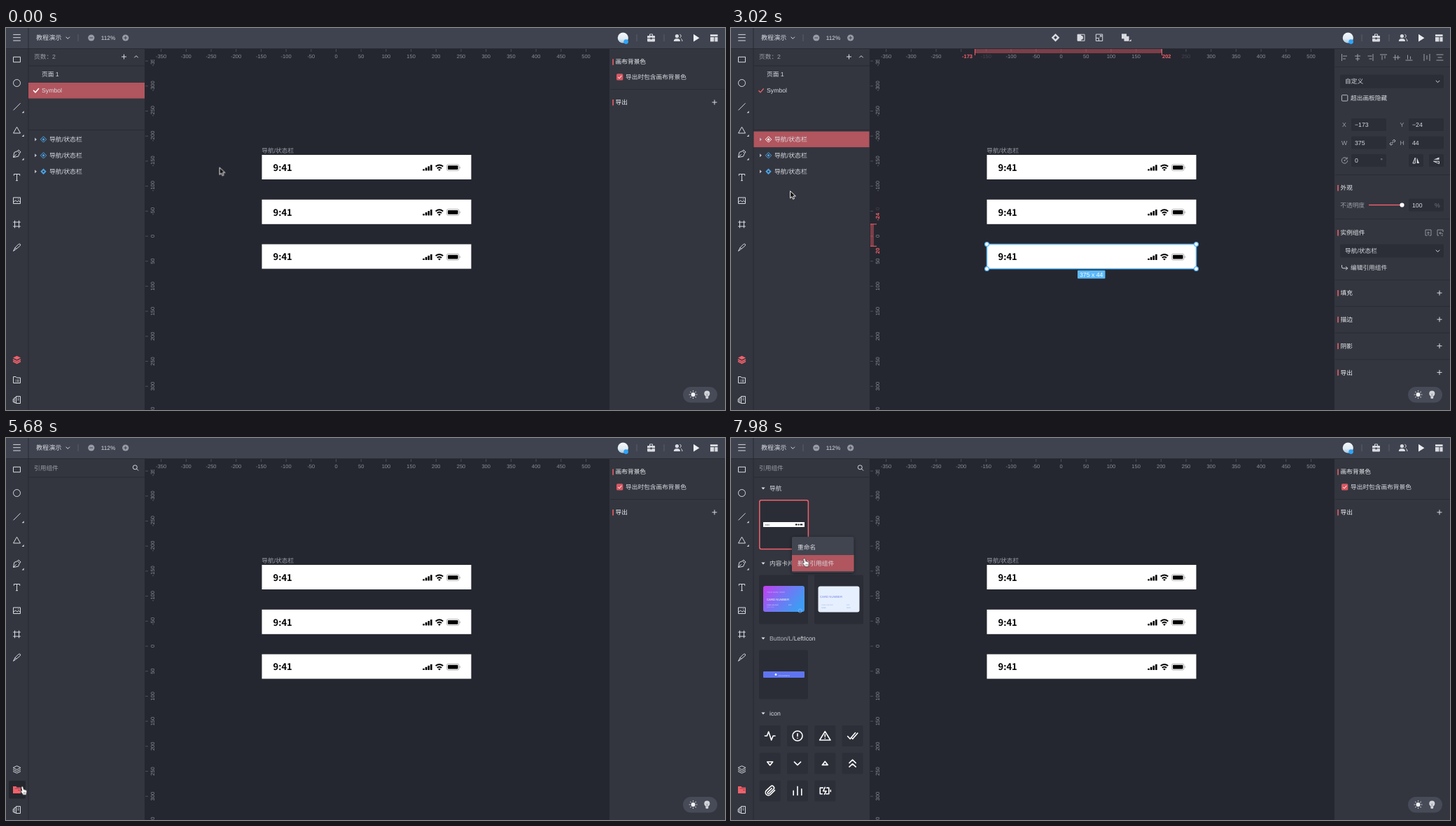
Recreate the animation shown at these times as an HTML page. Size 1027 by 545 pixels, loop 8000 ms.

```html
<!DOCTYPE html>
<html lang="zh-CN">
<head>
<meta charset="utf-8">
<title>Design editor</title>
<style>
html, body { margin: 0; width: 100%; height: 100%; overflow: hidden; background: #252730; }
svg { display: block; width: 100%; height: 100%; }
text { font: 8.7px "Liberation Sans", "Noto Sans CJK SC", sans-serif; fill: #d9dbe0; text-rendering: geometricPrecision; white-space: pre; }
.dim { fill: #9b9ea8; }
.tick { font-size: 7.5px; fill: #8b8e97; text-anchor: middle; }
.hot { font-size: 7.5px; font-weight: 700; fill: #f2616b; }
.mid { text-anchor: middle; }
.clock { font: 700 13px "Noto Sans CJK SC", "Noto Sans", sans-serif; fill: #000; }
.i { fill: none; stroke: #d9dbe0; stroke-width: 1; }
.w { stroke: #fff; stroke-width: 1.6; stroke-linejoin: round; stroke-linecap: round; }
.blue { fill: #5bb9fb; }

/* Every timed part is hidden or shown in hard steps; 1% is 80 ms. */
.t { opacity: 0; animation: 8s step-end infinite; }
.idle { animation-name: idle; } .sel { animation-name: sel; }
.s1 { animation-name: s1; } .s2 { animation-name: s2; } .s3 { animation-name: s3; } .inst { animation-name: inst; }
.h1 { animation-name: h1; } .h2 { animation-name: h2; } .h3 { animation-name: h3; }
.pages { animation-name: pages; } .lib { animation-name: lib; } .list { animation-name: list; }
.tile { animation-name: tile; } .pick { animation-name: pick; } .tag { animation-name: tag; }
.menu { animation-name: menu; } .del { animation-name: del; }
.arrow { animation-name: arrow; } .hand { animation-name: hand; }
@keyframes idle { 0%, 45.625% { opacity: 1 } 19.625% { opacity: 0 } }
@keyframes sel { 19.625% { opacity: 1 } 0%, 45.625% { opacity: 0 } }
@keyframes s3 { 19.625% { opacity: 1 } 0%, 25.625% { opacity: 0 } }
@keyframes s2 { 25.625% { opacity: 1 } 0%, 33.5% { opacity: 0 } }
@keyframes s1 { 33.5% { opacity: 1 } 0%, 45.625% { opacity: 0 } }
@keyframes inst { 25.625% { opacity: 1 } 0%, 45.625% { opacity: 0 } }
@keyframes h3 { 14% { opacity: 1 } 0%, 19.625% { opacity: 0 } }
@keyframes h2 { 23.375% { opacity: 1 } 0%, 25.625% { opacity: 0 } }
@keyframes h1 { 31.5% { opacity: 1 } 0%, 33.5% { opacity: 0 } }
@keyframes pages { 0% { opacity: 1 } 71% { opacity: 0 } }
@keyframes lib { 0% { opacity: 0 } 71% { opacity: 1 } }
@keyframes list { 0% { opacity: 0 } 72.875% { opacity: 1 } }
@keyframes tile { 57.875% { opacity: 1 } 0%, 74.875% { opacity: 0 } }
@keyframes pick { 0% { opacity: 0 } 80.875% { opacity: 1 } }
@keyframes tag { 80.875% { opacity: 1 } 0%, 96% { opacity: 0 } }
@keyframes menu { 0% { opacity: 0 } 88.5% { opacity: .45 } 92.25% { opacity: 1 } }
@keyframes del { 0% { opacity: 0 } 96% { opacity: 1 } }
@keyframes arrow { 0%, 35.625%, 74.875% { opacity: 1 } 14%, 57.875%, 80.875% { opacity: 0 } }
@keyframes hand { 0%, 35.625%, 74.875% { opacity: 0 } 14%, 57.875%, 80.875% { opacity: 1 } }
.cursor { animation: move 8s step-end infinite; }
@keyframes move {
  0% { transform: translate(304.5px, 198.5px) }
  1.75% { transform: translate(304px, 199px) }
  6.625% { transform: translate(268px, 214px) }
  8.5% { transform: translate(195px, 236px) }
  10.375% { transform: translate(122px, 245px) }
  12.25% { transform: translate(92px, 236px) }
  14% { transform: translate(86px, 209px) }
  15.875% { transform: translate(85px, 200px) }
  23.375% { transform: translate(87px, 184px) }
  25.625% { transform: translate(89px, 176px) }
  27.875% { transform: translate(89px, 174px) }
  31.5% { transform: translate(90px, 158px) }
  33.5% { transform: translate(91px, 153px) }
  35.625% { transform: translate(92px, 134px) }
  37.75% { transform: translate(84px, 232px) }
  39.875% { transform: translate(77px, 297px) }
  41.875% { transform: translate(73px, 326.5px) }
  49.25% { transform: translate(67px, 360px) }
  51.375% { transform: translate(47px, 420px) }
  53.5% { transform: translate(26px, 476px) }
  55.625% { transform: translate(14px, 510px) }
  57.875% { transform: translate(15px, 503px) }
  65.375% { transform: translate(18px, 499px) }
  67.25% { transform: translate(20px, 496.5px) }
  74.875% { transform: translate(30px, 438px) }
  76.875% { transform: translate(60px, 305px) }
  78.875% { transform: translate(80px, 190px) }
  80.875% { transform: translate(84px, 146px) }
  82.875% { transform: translate(84px, 140px) }
  84.75% { transform: translate(84.6px, 140px) }
  92.25% { transform: translate(93px, 150px) }
  94.125% { transform: translate(97.5px, 159px) }
  96% { transform: translate(99px, 165px) }
  97.875% { transform: translate(101px, 169px) }
  99.75% { transform: translate(101.5px, 171px) }
}
</style>
</head>
<body>
<svg viewBox="0 0 1027 545" xmlns="http://www.w3.org/2000/svg"></svg>
<script>
const CANVAS = '#252730', PANEL = '#33363f', BAR = '#3e434f', EDGE = '#292b33',
      FIELD = '#2b2e37', ROW = '#b1555e', RED = '#f2616b', BLUE = '#5bb9fb', GREY = '#9b9ea8';

const txt = (x, y, s, a = '') => `<text x="${x}" y="${y + 3.1}" ${a}>${s}</text>`;
const box = (x, y, w, h, fill, a = '') => `<rect x="${x}" y="${y}" width="${w}" height="${h}" fill="${fill}" ${a}/>`;
const dot = (x, y, r, fill, a = '') => `<circle cx="${x}" cy="${y}" r="${r}" fill="${fill}" ${a}/>`;
const icon = (x, y, d, a = '', cls = '') => `<path class="i ${cls}" transform="translate(${x} ${y})" d="${d}" ${a}/>`;
const solid = (x, y, d, fill = '#d9dbe0') => `<path transform="translate(${x} ${y})" d="${d}" fill="${fill}"/>`;
const timed = (cls, ...parts) => `<g class="t ${cls}">${parts.join('')}</g>`;
const each = (list, f) => list.map(f).join('');
const range = (a, b, f) => Array.from({ length: b - a + 1 }, (_, i) => f(a + i)).join('');

const PLUS = 'M-3.5 0h7M0-3.5v7', DOWN = 'M-2.7-1.3L0 1.4 2.7-1.3', UP = 'M-2.7 1.3L0-1.4 2.7 1.3',
      CHECK = 'M-3.5 0l2.5 2.6L3.6-2.8', DIAMOND = 'M0-4.2L4.2 0 0 4.2-4.2 0z',
      STACK = 'M0-5.2l5.5 2.7L0 .2l-5.5-2.7z', STACK2 = 'M-5.5 0L0 2.7 5.5 0M-5.5 2.5L0 5.2l5.5-2.7',
      FOLDER = 'M-5-4.5h3.6l1.2 1.5H5v7.5H-5z';

// Canvas with rulers
const rulers = () =>
  range(-7, 10, n => {
    const x = 471.5 + 35.7 * n;
    return box(x - .5, 30, 1, 4, '#4c4f59') + txt(x, 40, 50 * n, 'class="tick"');
  }) +
  '<clipPath id="side"><path d="M199 45h20v500h-20z"/></clipPath><g clip-path="url(#side)">' +
  range(-7, 7, n => {
    const y = 297 + 35.7 * n;
    return box(199, y - .5, 4, 1, '#4c4f59') + upright(y, 50 * n, 'tick');
  }) + '</g>';
const upright = (y, s, cls) =>
  `<text transform="translate(211.6 ${y}) rotate(-90)" class="${cls}" text-anchor="middle">${s}</text>`;
const fade = (x, y, w, h, o = 1) => box(x, y, w, h, CANVAS, `opacity="${o}"`);
const hSpan = () =>
  fade(318, 36, 30, 10) + fade(348, 36, 25, 10, .7) + fade(606, 36, 29, 10) + fade(635, 36, 25, 10, .7) +
  box(348, 30, 268, 6, RED, 'opacity=".42"') + range(-3, 3, n => box(471 + 35.7 * n, 30, 1, 4, '#8d4b55')) +
  box(348, 30, 1, 9, RED) + box(615, 30, 1, 9, RED) +
  txt(345, 40, '-173', 'class="hot" text-anchor="end"') + txt(616, 40, '202', 'class="hot"');
const vSpan = (value) => {
  const a = 297 + value * .714, b = a + 31.4;
  return fade(204, a - 44, 12, 24, .7) + fade(204, a - 20, 12, 32) + fade(204, b - 4, 12, 19) +
    box(199, a, 5, b - a, RED, 'opacity=".42"') + box(199, a - .5, 9, 1, RED) + box(199, b - .5, 9, 1, RED) +
    upright(a - 10.5, value, 'hot') + upright(b + 6.5, value + 44, 'hot');
};

const board = y => box(365.5, y, 299, 35, '#fff') + txt(381.5, y + 19.8, '9:41', 'class="clock"') +
  range(0, 3, i => box(595.3 + 3.6 * i, y + 20.2 - 2 * i, 2.6, 2.4 + 2 * i, '#000', 'rx=".6"')) +
  icon(619, y + 22, 'M-5.3-5.4Q0-9.6 5.3-5.4M-3.2-2.7Q0-5.3 3.2-2.7', 'style="stroke:#000;stroke-width:1.9"') +
  solid(619, y + 22, 'M-1.9-.9Q0-2.5 1.9-.9L0 1.1z', '#000') +
  box(629.5, y + 13.7, 17.6, 8.8, 'none', 'rx="2.2" stroke="#aaa" stroke-width=".9"') +
  box(631, y + 15.2, 14.6, 5.8, '#000', 'rx="1"') + box(647.9, y + 16.8, 1, 2.6, '#aaa', 'rx=".5"');
const outline = y => box(365.5, y, 299, 35, 'none', `stroke="${BLUE}" stroke-width="1.5"`);
const picked = y => outline(y) +
  each([[365.5, y], [664.5, y], [365.5, y + 35], [664.5, y + 35]],
    ([x, v]) => dot(x, v, 2.9, '#fff', `stroke="${BLUE}" stroke-width="1.2"`)) +
  box(495, y + 37.3, 39.5, 11.7, BLUE, 'rx="1"') + txt(514.7, y + 43.2, '375 x 44', 'class="mid" style="fill:#fff"');
const boardName = cls => txt(365.3, 174.5, '导航/状态栏', `class="${cls}"`);

// Layer list
const BOARDS = { 1: 308.5, 2: 244.8, 3: 181 };
const rowY = n => 136 + 22.9 * n;
const layer = (n, tint = '#4ba5e6') => {
  const y = rowY(n);
  return solid(42.5, y, 'M-1.5-2.5L1.5 0-1.5 2.5z', '#b9bcc4') +
    (n == 3 ? solid(53.5, y, DIAMOND, tint) + dot(53.5, y, 1.2, PANEL)
            : icon(53.5, y, DIAMOND, `style="stroke:${tint}"`) + solid(53.5, y, 'M0-2L2 0 0 2-2 0z', tint)) +
    txt(62, y, '导航/状态栏', 'style="font-size:8.9px"');
};
const layerTools = y =>
  box(165.5, y - .5, 6, 4, '#e6e7ea', 'rx=".6"') + icon(166, y, 'M-1.2-.5v-1.4a1.7 1.7 0 0 1 3.4 0v.6') +
  icon(182.5, y, 'M-4.3 0Q0-5.6 4.3 0 0 5.6-4.3 0z') + dot(182.5, y, 1.5, '#e6e7ea');
const rowFrame = (n, fill, a) => box(32.5, rowY(n) - 11.3, 165, 22.5, fill, a);
const hoverRow = n => timed('h' + n, rowFrame(n, PANEL, `stroke="${RED}" stroke-width=".9"`), layer(n),
  layerTools(rowY(n)), outline(BOARDS[n]), n == 3 ? boardName('blue') : '');
const pickedRow = n => timed('s' + n, rowFrame(n, ROW), layer(n, '#fff'), n > 1 ? layerTools(rowY(n)) : '',
  picked(BOARDS[n]), n == 3 ? boardName('blue') : '', vSpan({ 1: -24, 2: -104, 3: -184 }[n]),
  txt(973, 138, { 1: '−24', 2: '−104', 3: '−184' }[n]));
const pagesPanel = () => timed('pages',
  txt(40, 41, '页数：2', 'class="dim"'), icon(168.5, 41, PLUS), icon(186, 41, UP),
  box(32, 53.5, 166, 1, EDGE), txt(51, 66, '页面 1'),
  timed('idle', box(32, 78, 166, 22.5, ROW), icon(43, 89.3, CHECK, '', 'w" stroke-width="1.2')),
  timed('sel', icon(43, 89.3, CHECK, `style="stroke:${RED};stroke-width:1.3"`)),
  txt(51, 89.2, 'Symbol'), box(32, 145, 166, 1, EDGE),
  layer(1), layer(2), layer(3));

// Component library
const group = (y, s) => solid(46, y, 'M-2.6-1.4h5.2L0 1.6z', '#e0e2e6') + txt(55, y, s);
const thumb = (x, y) => box(x, y, 70, 70, '#2a2d35', 'rx="2"');
const small = (x, y, s, size, fill, a = '') => txt(x, y - 2, s, `style="font-size:${size}px;fill:${fill}" ${a}`);
const glyphs = [
  'M-7.3 0h3l2.3-6 4 12 2.4-6h2.9',
  'M-7 0a7 7 0 1 0 14 0a7 7 0 1 0-14 0M0-3.3V.6M0 3.2v.1',
  'M0-6.4L7.7 6H-7.7zM0-2v3M0 3.5v.1',
  'M-7 .5l3.5 3.8L4-4.5M-.8 3.2l1 1.1L7.3-4',
  'M-4-2.2h8L0 2.8z', 'M-4.6-2L0 2.4 4.6-2', 'M-4 2.2h8L0-2.8z',
  'M-4.6-.6L0-5 4.6-.6M-4.6 5L0 .6 4.6 5',
  'M6.8-.8L.6 5.3a4.1 4.1 0 0 1-5.8-5.8L1-6.2a2.8 2.8 0 0 1 4 4L-1.2 3.8a1.3 1.3 0 0 1-1.9-1.9L2.4-3.5',
  'M-5.8 6V0M0 6V-6M5.8 6V-2.5',
  'M-3-4.3h-4v8.6h3M2.5-4.3h3v8.6H1.6M8-1v2M0-5L-2.6.3h4.4L-.9 5'];
const library = () => timed('lib',
  txt(40, 42.7, '引用组件', 'class="dim"'), icon(184.8, 42.3, 'M-3.5-.5a3 3 0 1 0 6 0a3 3 0 1 0-6 0M1.7 1.7L4.3 4.3'),
  box(32, 55.5, 166, 1, EDGE),
  timed('list',
    group(72, '导航'), thumb(40.5, 88.5), box(46, 120, 59, 7, '#fff'),
    small(49, 124.3, '9:41', 3, '#000'), box(92, 122.5, 2.6, 2, '#111'), dot(96.6, 123.6, 1.1, '#111'), box(98.6, 122.5, 3.6, 2, '#111'),
    timed('tag', txt(75.7, 150.2, '状态栏', 'class="mid"')),
    timed('pick', box(40.8, 88.8, 69.6, 69.6, 'none', `rx="2.5" stroke="${RED}" stroke-width="1.5"`)),
    group(179, '内容卡片'), thumb(40, 195.5), thumb(119, 195.5),
    box(46, 211, 59, 37, 'url(#card)', 'rx="3"'), box(124.5, 211.5, 59, 37, '#e6effe', 'rx="3"'),
    small(51, 220.3, 'YOUR BANK HERE', 2.9, '#f4d8ff', 'opacity=".6"'),
    small(51, 230.5, 'CARD NUMBER', 4.3, '#fff', 'font-weight="700"'),
    small(51, 237.6, 'CARD HOLDER', 2.3, '#e4dcff'), small(82, 237.6, 'EXP', 2.3, '#dfe9ff'),
    small(51, 241, '0000 0000', 2.3, '#d4c8ff', 'opacity=".6"'),
    dot(98.7, 246.5, 2.6, 'none', 'stroke="#8fb6ff" stroke-width=".8"'),
    small(127, 226.5, 'CARD NUMBER', 4.3, '#7386e4', 'font-weight="700"'),
    small(129, 238, 'CARD HOLDER', 2.3, '#9fb4dc'), small(165, 238, 'EXP', 2.3, '#9fb4dc'),
    small(129, 241.6, 'NAME', 2.3, '#86a6dc'), small(165, 241.6, '00/00', 2.3, '#86a6dc'),
    group(286, '<tspan fill="#b4b7bf">Button/L/</tspan>LeftIcon'), thumb(40, 302.5),
    box(46, 333, 59, 9, '#6074f2', 'rx="1"'), dot(64, 337.5, 1.4, '#fff'), small(67.5, 338.6, 'ADD ADDRESS', 2.3, '#e2e6ff'),
    group(393, 'icon'),
    glyphs.map((d, i) => {
      const x = 55.7 + 39.3 * (i % 4), y = 425 + 39.2 * (i >> 2);
      return box(x - 15, y - 15, 30, 30, '#2c2f38', 'rx="2"') + icon(x, y, d, '', 'w');
    }).join('')),
  timed('menu', box(87, 141, 88.5, 51, '#414550', 'rx="2" style="filter:drop-shadow(0 1px 2px #0007)"'),
    timed('del', box(87, 167, 88.5, 23, ROW)), txt(95, 155.4, '重命名'), txt(95, 178.4, '删除引用组件')));

// Inspector
const title = (y, s, add) => box(866.3, y - 4, 1.5, 8.5, RED) + txt(870.6, y, s, 'style="fill:#eceef1"') + (add ? icon(1012, y, PLUS) : '');
const rule = y => box(863, y, 164, 1, EDGE, 'opacity=".8"');
const field = (x, y, w, s = '', h = 18) => box(x, y - h / 2, w, h, FIELD, 'rx="2"') + txt(x + 5, y, s);
const select = (y, s) => box(870, y - 9.5, 148, 19, FIELD, 'rx="2"') + txt(877, y, s) + icon(1009.5, y, DOWN);
const styles = top => each(['填充', '描边', '阴影', '导出'],
  (s, i) => rule(top - 19 + 37.8 * i) + title(top + 37.8 * i, s, true));
const aligns = [[876.5, 'M-4-5v10M-2.5-2h6M-2.5 2h4'], [895, 'M0-5v10M-4-2h8M-3 2h6'], [913, 'M4-5v10M2.5-2h-6M2.5 2h-4'],
  [932, 'M-5-4h10M-2-2.5v6M2-2.5v4'], [950.7, 'M-5 0h10M-2-4v8M2-3v6'], [968.5, 'M-5 4h10M-2 2.5v-6M2 2.5v-4'],
  [994, 'M-4-5v10M4-5v10M0-3v6'], [1012.5, 'M-5-4h10M-5 4h10M-3 0h6']];
const inspector = () =>
  timed('idle', title(48.3, '画布背景色'), box(872, 65.3, 9.3, 9.3, '#d95863', 'rx="1.5"'),
    icon(876.7, 70, 'M-2.5 0l1.8 1.9L2.6-2', 'style="stroke:#fff"'), txt(885, 70, '导出时包含画布背景色'),
    rule(87), title(106, '导出', true)) +
  timed('sel',
    each(aligns, ([x, d]) => icon(x, 42, d, `style="stroke:${GREY}"`)), rule(55),
    select(76.3, '自定义'), box(872.4, 95.7, 8.4, 8.4, 'none', 'rx="1" stroke="#c9ccd2" stroke-width=".9"'),
    txt(885, 100, '超出画板隐藏'),
    txt(873, 138, 'X', 'class="dim"'), field(886, 138, 50, '−173'), txt(955.5, 138, 'Y', 'class="dim"'), field(968, 138, 50),
    txt(872, 163.4, 'W', 'class="dim"'), field(886, 163.4, 50, '375'), txt(955.5, 163.4, 'H', 'class="dim"'), field(968, 163.4, 50, '44'),
    icon(945, 163.2, 'M-1 1l2-2M0-2l1.5-1.5a1.5 1.5 0 0 1 2 2L2 0M0 2l-1.5 1.5a1.5 1.5 0 0 1-2-2L-2 0'),
    icon(876.5, 189, 'M3-3a4.2 4.2 0 1 0 1.2 3M3.6-4.6V-2H1', `style="stroke:${GREY}"`) + dot(876.5, 189, 1, GREY),
    field(886, 189, 50, '0'), txt(927.5, 189, '°', 'class="dim"'), field(968, 189, 21), field(997, 189, 21),
    icon(978.5, 189, 'M-1.2-4v8h-3.4z') + solid(978.5, 189, 'M1.2-4v8h3.4z'),
    icon(1007.5, 189, 'M4 1.2h-8l8 3.4z') + solid(1007.5, 189, 'M4-1.2h-8l8-3.4z'),
    rule(209), title(228, '外观'), txt(870.3, 252.5, '不透明度', 'class="dim"'),
    box(911, 251.8, 47, 1.4, RED), dot(958.5, 252.5, 3.1, '#fff'), field(968, 252.5, 50, '100'),
    txt(1005, 252.5, '%', 'style="fill:#6f727c"'), rule(272),
    each([[996, 'M1.5 4H4V-4H-4v8h2.5M0 4v-5M-1.8.6L0-1.2 1.8.6'], [1013, 'M1.5 4H4M4-1v-3H-4v8h2M4 2Q2 0-1 .6M.6-1.4L-1.2.6.8 2.2']],
      ([x, d]) => icon(x, 292, d, `style="stroke:${GREY};stroke-width:.9"`)),
    timed('s3', title(292, '引用组件'), styles(335)),
    timed('inst', title(292, '实例组件'), select(318, '导航/状态栏'),
      icon(876.5, 341.8, 'M-4-3.5V-1Q-4 1-2 1H4M1.7-1.5L4.2 1 1.7 3.5'), txt(885, 342, '编辑引用组件'), styles(378)),
    solid(463.5, 13.7, 'M0-5.8L5.8 0 0 5.8-5.8 0zM0-2.4L-2.4 0 0 2.4 2.4 0z'),
    icon(500, 13.7, 'M-5-4.5H5v9H-5z') + solid(500, 13.7, 'M0-4.5V4.5H-5v-9zM0-3a3 3 0 0 1 0 6z'),
    icon(526, 13.7, 'M-4.7-4.7h9.4v9.4h-9.4zM-4.7.7H-.7v4M.3-.3L3-3M.8-3H3V-.8'),
    box(558, 8.3, 7, 7, '#d9dbe0') + box(561.5, 11.8, 7, 7, '#d9dbe0', 'rx=".5"') + solid(570.3, 17.8, 'M1.3-1.8v3H-1.7z'));

// Fixed chrome
const tools = [
  [45, 'M-5-3.7H5v7.4H-5z'], [78.5, 'M-5 0a5 5 0 1 0 10 0a5 5 0 1 0-10 0'], [112.3, 'M-5 5L5-5', 1], [146, 'M0-4.8L5 4H-5z', 1],
  [179.5, 'M-5 5l1.3-7L1-4 4-1 2 3.7zM-5 5l4.2-4.2M1-4l1.4-1.6L5.6-2.4 4-1', 1], [213, 'M-4.2-2.3v-2.2h8.4v2.2M0-4.5v9.2M-1.5 4.7h3'],
  [246.2, 'M-5-4.3H5v8.6H-5zM-5 2.6l3-3 2.4 2.4L2.5 0 5 2.6M1.6-2.2h1'], [280, 'M-3-5.3V5.3M3-5.3V5.3M-5.3-3H5.3M-5.3 3H5.3'],
  [313.3, 'M-5 5l2.6-5L2-4.5Q4.5-6 5-4.6 5.4-3.4 4-2L-1 2zM-2.4 0L-.8 2']];
const chrome = () =>
  box(0, 30, 32, 515, PANEL) + box(32, 30, 166, 515, PANEL) + box(862, 30, 165, 515, PANEL) +
  box(0, 0, 1027, 29.5, BAR) + box(0, 29, 1027, 1, EDGE) + box(31.5, 30, 1, 515, EDGE) +
  each([32, 103, 901, 940], x => box(x - .5, x == 32 ? 0 : 9, 1, x == 32 ? 29 : 10, x == 32 ? EDGE : '#5b5f6a')) +
  icon(15.5, 13.7, 'M-5.3-4.3H5.3M-5.3 0H5.3M-5.3 4.3H5.3') +
  txt(43, 14, '教程演示', 'style="font-size:9.1px"') + icon(88.3, 14, DOWN) +
  dot(121.8, 14, 4.6, '#989ca6') + icon(121.8, 14, 'M-2.4 0h4.8', `style="stroke:${BAR}"`) +
  txt(146, 14, '112%', 'class="mid" style="font-size:8.2px"') +
  dot(170.7, 14, 4.6, '#989ca6') + icon(170.7, 14, 'M-2.4 0h4.8M0-2.4v4.8', `style="stroke:${BAR}"`) +
  dot(881.3, 14, 7.6, 'url(#face)') + dot(885.6, 19.6, 3.3, '#2fa4fa') +
  box(916, 11, 11, 8.4, '#d9dbe0', 'rx="1"') + icon(921.5, 10.5, 'M-2 .5V-1.6h4V.5') + box(916, 14.3, 11, .9, BAR) + box(920.5, 13.5, 2, 2.8, BAR) +
  dot(958.4, 11.5, 2.6, '#d9dbe0') + solid(958.4, 19, 'M-4.6 0q0-4 4.6-4t4.6 4z') +
  icon(963, 14, 'M-.6-4.8a2.3 2.3 0 0 1 0 4.5M1 1.2q2 .8 2 3.8') +
  solid(986, 14.2, 'M-4-5.4L4.4 0-4 5.4z', '#eceef1') +
  box(1006, 9.2, 10.6, 2.8, '#d9dbe0') + box(1006, 13, 5.4, 6.4, '#d9dbe0') + box(1012.4, 13, 4.2, 6.4, '#d9dbe0') +
  each(tools, ([y, d, more]) => icon(15.5, y, d) + (more ? solid(24.3, y + 7.7, 'M1.3-1.7v3h-3z') : '')) +
  timed('tile', box(4, 489, 24, 25.5, '#25272e', 'rx="2"')) +
  timed('pages', solid(15.5, 473, STACK, RED), icon(15.5, 473, STACK2, `style="stroke:${RED};stroke-width:1.7"`),
    icon(15.5, 502, FOLDER), icon(15.5, 502, 'M-2 .3h1M0 .3h3M-2 2.3h1M0 2.3h3', 'style="stroke-width:.9"')) +
  timed('lib', icon(15.5, 473, STACK + STACK2), solid(15.5, 502, 'M-5.5-5H-1l1 1.5h5.5V5h-11z', RED),
    icon(15.5, 502, 'M-3-2h8M1.5.5h3', 'style="stroke:#8f3f48;stroke-width:.9"')) +
  icon(15.5, 530.5, 'M-1-5h6V5h-6zM-1-3.6l-2.5.6V4L-1 4.5M-3.5-1.8L-5.3-1V3l1.8.7M1-2.5h2M1 0h2');
const themeSwitch = () => box(967, 512, 49, 22.5, '#474b58', 'rx="11.2"') + dot(981.5, 523, 3, '#f2f3f5') +
  range(0, 7, i => `<path class="i" d="M0-4.3v-1.6" transform="translate(981.5 523) rotate(${45 * i})"/>`) +
  dot(1001.3, 521.4, 4, '#d4d6db') + box(999.4, 524.5, 3.8, 4.2, '#d4d6db', 'rx="1"') + icon(1001.3, 522, 'M-1.4-.5L0 1l1.4-1.5M0 1v3', 'style="stroke:#7d808a;stroke-width:.7"');
const cursor = () => '<g class="cursor">' +
  timed('arrow', '<path d="M.6.6V10.8L3 8.6l1.6 3.6 1.9-.8L4.9 7.9h3.5z" fill="#111" stroke="#fff" stroke-width=".95"/>') +
  timed('hand', '<path d="M2.6.9q1.3-.7 1.9.6l.9 3.6q1.1-.5 1.6.4 1-.4 1.4.5 1.2 0 1.4 1.3.2 2.4-.7 3.7l.1 1.7H4.1l-.3-1.3Q2.6 10.300 1.200 8.300.2 6.800 1.300 6.400q.8-.1 1.600.9L1.800 2.400Q1.600 1.300 2.600.9z" fill="#fff" stroke="#222" stroke-width=".7"/><path d="M5.300 8.600v2.200M6.700 8.600v2.200M8 8.600v2.200" class="i" style="stroke:#555;stroke-width:.6"/>') + '</g>';

document.querySelector('svg').innerHTML =
  `<defs><linearGradient id="card" x2="1" y2=".5"><stop stop-color="#c53cf0"/><stop offset=".5" stop-color="#7a72f4"/><stop offset="1" stop-color="#3f9bf3"/></linearGradient>
  <linearGradient id="face" x2="0" y2="1"><stop stop-color="#f4f8fb"/><stop offset=".6" stop-color="#dfeaf2"/><stop offset="1" stop-color="#9cc4de"/></linearGradient></defs>` +
  box(0, 0, 1027, 545, CANVAS) + rulers() + timed('sel', hSpan()) +
  boardName('dim') + each([181, 244.8, 308.5], board) +
  chrome() + inspector() + pagesPanel() + each([3, 2, 1], n => pickedRow(n)) + each([3, 2, 1], n => hoverRow(n)) +
  library() + themeSwitch() + cursor();
</script>
</body>
</html>
```
